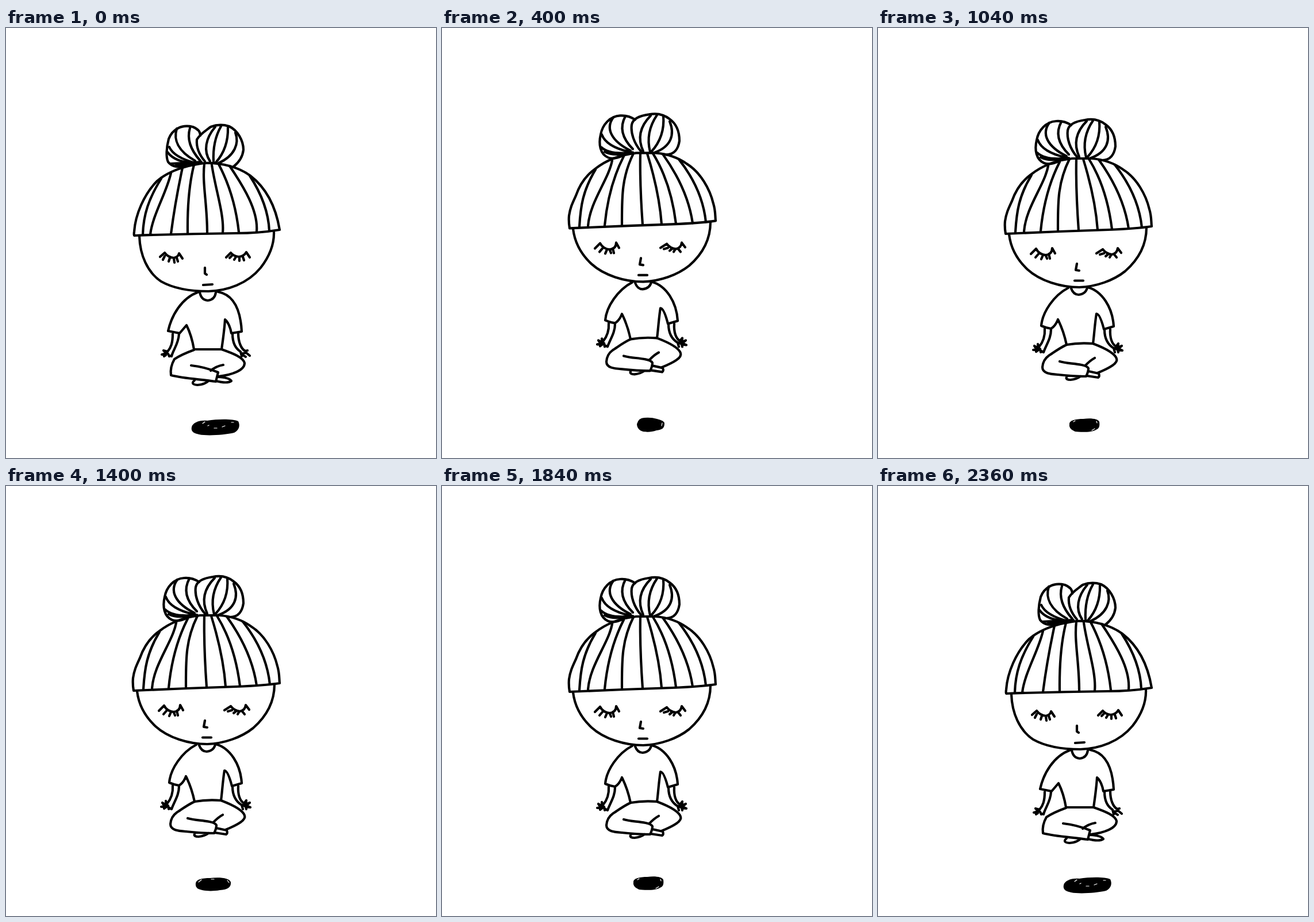
An HTML page for the animation above (2.4 s loop, 748 px wide and 748 px high).

```html
<!DOCTYPE html>
<html lang="en">
<head>
<meta charset="utf-8">
<title>Floating meditation</title>
<style>
html, body { margin: 0; width: 100%; height: 100%; overflow: hidden; background: #fff; }
svg { display: block; width: 100vw; height: 100vh; }
.girl { fill: none; stroke: #000; stroke-width: 4.2; stroke-linecap: round; stroke-linejoin: round; }
.shade path { fill: #000; }
.shade .gap { fill: none; stroke: #fff; stroke-width: 1.2; stroke-linecap: round; }
.girl, .shade { display: none; }
.on { display: inline; }
</style>
</head>
<body>
<svg viewBox="0 0 748 748">
  <g class="girl" id="round">
    <!-- buns -->
    <path d="M338 187Q338 177 325 172C305 167 289 177 283 193C279 208 278 225 282 233C288 241 301 244 313 239"/>
    <path d="M346 232C334 218 331 206 332 194C338 184 347 179 356 172Q372 166 388 171C403 178 413 196 413 212Q411 229 396 241"/>
    <path d="M297 175C291 194 299 214 329 231M320 174C314 194 321 212 338 231M284 207Q292 225 330 235M281 216Q294 234 330 235M286 236L340 233M296 239L324 236"/>
    <path d="M364 172C347 192 343 214 355 232M374 171C362 192 360 214 361 233M386 173Q387 209 365 234M399 182C406 201 398 222 370 235"/>
    <!-- hair -->
    <path d="M224 361Q222 362 223 354C225 325 240 289 263 266C285 247 315 239 345 235C375 234 405 242 425 257C455 280 470 315 476 351Q440 357 400 357Q310 358 224 361"/>
    <path d="M270 262C248 297 239 325 238 359M287 252C280 285 255 325 251 359M307 243C298 285 291 327 287 358M327 238Q315 285 316 357M345 236C341 270 350 305 350 356M358 238C364 280 380 325 377 356M370 237C390 275 401 318 405 355M389 240C414 277 439 318 436 354M424 257Q456 306 458 353"/>
    <!-- face -->
    <path d="M232 362C233 395 246 425 270 441C295 455 325 458 352 458C385 457 420 445 443 417C460 395 467 375 466 353"/>
    <path d="M268 398L276 391Q282 399 292 400Q300 398 301 392L307 401M276 397L273 403M285 400L283 406M292 401L293 408M297 400L299 406"/>
    <path d="M383 399L391 391Q396 397 405 398Q414 397 418 390L424 399M393 396L389 400M400 398L397 403M406 398L406 405M412 398L414 404"/>
    <path d="M346 417L346 427L349 429M343 447L359 446"/>
    <!-- body -->
    <path d="M337 459Q339 473 351 474Q363 473 365 460M335 459C305 470 288 500 282 527L302 531L314 517Q323 535 327 559H375C377 545 380 525 381 507Q389 514 392 531L410 528C408 490 396 464 369 459"/>
    <path d="M290 532C290 548 287 556 281 563M301 532C300 550 291 559 288 571L284 570M281 563L274 561L279 566L271 568L278 569L275 571M282 567L284 571"/>
    <path d="M394 532C394 548 400 558 408 563L410 571M404 531C404 546 409 558 416 562L420 561M412 566L418 565L424 570M412 569L417 572"/>
    <path d="M327 560Q305 568 293 576Q285 590 287 604C310 610 340 611 365 615L369 599C352 592 340 589 322 587M375 559C395 566 413 573 415 583C415 595 395 603 370 606M356 596Q366 588 378 586M369 607Q388 608 392 614Q385 619 365 614M328 613Q320 620 333 621Q346 620 352 614"/>
  </g>

  <g class="girl" id="wide">
    <!-- buns -->
    <path d="M336 179Q324 171 310 172C292 173 279 188 276 205C272 222 275 239 289 245Q299 249 316 241"/>
    <path d="M346 234C334 220 328 202 330 188C332 177 345 172 360 170C375 167 386 170 396 178C410 188 413 202 413 216C411 230 404 240 390 240"/>
    <path d="M298 175C284 194 294 216 328 233M319 173C308 193 314 212 332 230M278 205Q286 226 326 235M277 227Q292 241 332 236M283 235Q296 242 322 238"/>
    <path d="M363 172C344 191 340 212 350 234M374 171C359 193 357 215 362 235M385 172Q388 209 364 235M396 182C405 204 400 226 368 237"/>
    <!-- hair -->
    <path d="M222 368Q220 356 221 346C223 332 227 324 233 311C241 288 252 275 266 265C285 250 310 240 338 237L372 237C395 239 412 246 426 256C450 271 466 300 472 325C476 338 475 346 476 355Q450 359 400 361Q310 364 222 368"/>
    <path d="M267 266C245 302 241 330 239 365M296 250C290 283 257 322 254 364M316 243C296 282 287 322 283 363M333 238C312 280 313 315 313 362M345 238C344 285 346 320 349 362M357 238C370 280 379 320 382 361M367 238C390 275 402 320 407 360M384 239C412 278 430 318 436 359M412 248Q453 300 459 357"/>
    <!-- face -->
    <path d="M228 369C231 394 243 414 260 430C282 450 318 461 350 461C380 460 410 449 430 433C455 411 467 386 467 357"/>
    <path d="M266 403L275 394Q280 404 292 405Q303 403 303 393L308 402M280 402L274 409M287 405L284 412M292 406L294 411M297 403L299 411"/>
    <path d="M380 402L391 395Q397 403 407 404Q416 402 417 393L423 401M393 402L386 404M401 403L396 407M406 404L403 409M411 404L415 409"/>
    <path d="M346 420L344 431L350 432M342 449.500L357 449.500"/>
    <!-- body -->
    <path d="M336 463Q340 474 349 474Q361 473 364 462M331 462C306 475 286 504 284 528Q293 532 301 533Q309 528 313 517Q323 537 328 561Q350 557 374 559C376 545 377 525 380 507Q386 507 393 534L410 529C408 496 390 468 365 461"/>
    <path d="M290 533C291 549 285 559 280 565M301 534C301 550 293 560 288 574L284 572M280 565L278 560L279 567L272 563L276 569L270 570L279 570L275 573M282 568L283 574"/>
    <path d="M394 535C394 552 402 562 410 567L412 574M404 534C403 549 407 560 414 564L418 559L417 566L424 563L418 568L425 571L417 570L418 574M412 567L416 569"/>
    <path d="M328 561C315 567 305 575 297 580Q287 587 286 600C286 611 300 612 313 613Q340 616 362 616Q366 608 366 602Q364 598 354 596C340 593 330 594 316 590M374 559C395 567 412 576 415 585C418 593 404 601 382 610M361 597Q368 589 377 584M366 607L384 611Q386 616 383 618L363 615M328 617Q326 622 335 622Q345 621 352 616"/>
  </g>

  <g class="shade" id="s0">
    <path d="M323 694C325 687 335 682 350 683C370 680 395 680 404 684C408 692 405 700 397 704C380 708 350 710 336 707C328 705 321 703 323 694"/>
    <path class="gap" d="M351 692L353 691M362 696L367 696M376 694L381 692M392 686L396 686M342 688L346 685"/>
  </g>
  <g class="shade" id="s1">
    <path d="M326 694C327 686 340 682 357 682C378 680 396 682 399 688C401 698 396 704 380 705C360 709 336 708 329 702Q325 699 326 694"/>
    <path class="gap" d="M352 689L356 687M376 692L380 691"/>
  </g>
  <g class="shade" id="s2">
    <path d="M333 689C333 682 345 680 357 680C371 678 383 680 385 685C386 692 385 697 379 699C372 704 350 703 343 702C336 699 332 695 333 689"/>
    <path class="gap" d="M340 685L343 683M372 700L377 697M380 684L381 687"/>
  </g>
  <g class="shade" id="s3">
    <path d="M339 689Q342 678 352 678Q364 677 374 680Q387 683 387 688C387 696 383 699 373 700C362 704 349 703 345 700Q339 696 339 689"/>
    <path class="gap" d="M383 687L382 692"/>
  </g>
  <g class="shade" id="s4">
    <path d="M330 691C331 684 341 682 355 682C373 680 389 682 391 689C392 698 386 702 372 703C355 706 340 704 333 700Q329 696 330 691"/>
    <path class="gap" d="M335 689L340 685M357 684L362 684M385 686L388 690"/>
  </g>
</svg>
<script>
const TICK = 40, TICKS = 60, BOUNCE = 20;
const $ = id => document.getElementById(id);
const round = $("round"), wide = $("wide");
const shades = ["s0", "s1", "s2", "s3", "s4"].map($);

// [step in bounce, height]
const keys = [[0, 0], [2, 1], [4, 4], [6, 10], [8, 18], [10, 19.6], [11, 20.5], [13, 17.5], [15, 12], [17, 4], [19, 0], [20, 0]];
// [first step, shadow]
const spans = [[0, 0], [2, 1], [5, 2], [8, 3], [12, 4], [16, 1], [17, 0]];

function height(step) {
  const i = keys.findIndex(k => k[0] > step);
  const [a, ya] = keys[i - 1], [b, yb] = keys[i];
  return ya + (yb - ya) * (step - a) / (b - a);
}

function draw(now) {
  const tick = Math.floor(now / TICK) % TICKS, step = tick % BOUNCE;
  const isRound = tick < 4 || tick > 47;
  const lift = height(step) * (isRound ? 0.74 : 1);
  const girl = isRound ? round : wide;
  round.classList.toggle("on", isRound);
  wide.classList.toggle("on", !isRound);
  girl.setAttribute("transform", `translate(0 ${-lift})`);
  const shade = spans.filter(s => s[0] <= step).pop()[1];
  shades.forEach((s, i) => s.classList.toggle("on", i === shade));
}

const start = performance.now();
function loop() {
  draw(performance.now() - start);
  requestAnimationFrame(loop);
}
loop();
</script>
</body>
</html>
```
